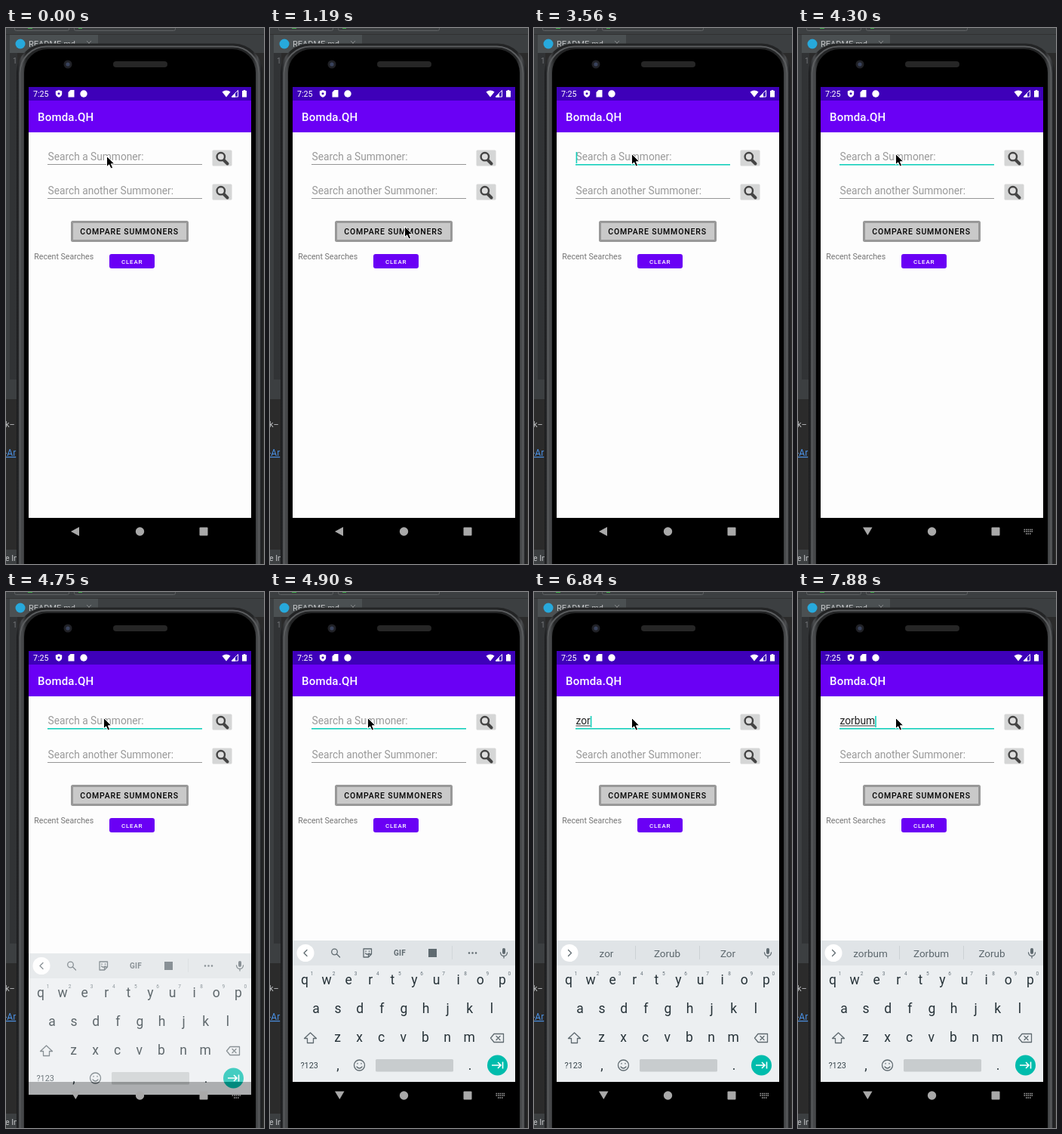
An HTML page for the animation above (8000 ms loop, 342 by 709 pixels).

```html
<!DOCTYPE html>
<html lang="en">
<head>
<meta charset="utf-8">
<title>Search screen</title>
<style>
  html, body { margin: 0; width: 100%; height: 100%; overflow: hidden; background: #2b2b2b; }
  svg { display: block; width: 342px; height: 709px; font-family: Roboto, "Noto Sans", sans-serif; }
  .hint { font-size: 13.75px; fill: #999; }
  .typed { font-size: 13.75px; fill: #222; }
  .medium { font-weight: 500; }
  .key { font-size: 17.5px; fill: #263238; text-anchor: middle; }
  .digit { font-size: 6.5px; fill: #66727a; text-anchor: middle; }
  .word { font-size: 13.5px; fill: #5c676d; text-anchor: middle; }
  .ide { font-size: 11px; fill: #c4c6c8; }
  .line { fill: none; stroke: #5f6a70; stroke-width: 1.3; stroke-linecap: round; stroke-linejoin: round; }
</style>
</head>
<body>
<svg viewBox="0 0 342 709">
  <defs>
    <g id="lens">
      <rect width="26" height="21" rx="1.5" fill="#d5d6d6"/>
      <path d="M14.5 12.5 L20 18" stroke="#444" stroke-width="4" stroke-linecap="round"/>
      <circle cx="11.3" cy="8.7" r="5.2" fill="#dedede" stroke="#444" stroke-width="2.4"/>
    </g>
    <linearGradient id="rim">
      <stop offset="0" stop-color="#17181a"/>
      <stop offset=".022" stop-color="#4b4d4f"/>
      <stop offset=".04" stop-color="#232425"/>
      <stop offset=".96" stop-color="#232425"/>
      <stop offset=".98" stop-color="#4b4d4f"/>
      <stop offset="1" stop-color="#17181a"/>
    </linearGradient>
  </defs>

  <!-- editor behind the phone -->
  <rect width="342" height="709" fill="#2b2b2b"/>
  <rect width="342" height="33" fill="#3c3f41"/>
  <rect width="5" height="466" fill="#3c3f41"/>
  <rect x="5" y="33" width="10" height="432" fill="#313335"/>
  <g fill="none" stroke="#5e6163">
    <rect x="11.5" y="-9" width="72" height="12.5" rx="2"/>
    <rect x="90.5" y="-9" width="134" height="12.5" rx="2"/>
    <path d="M0 8.5 H342" stroke="#323232"/>
  </g>
  <path d="M29 0 h6 M96 0 h5" stroke="#3fae49" stroke-width="2"/>
  <rect x="5" y="9" width="117" height="24" fill="#4b5052"/>
  <circle cx="19" cy="21" r="6.5" fill="#27a9dc"/>
  <text class="ide" x="30" y="25">README.md</text>
  <path d="M107 17 l6 6 m0 -6 l-6 6" stroke="#85888a"/>
  <text class="ide" x="9" y="47" style="font-size:10px;fill:#75787b">1</text>
  <rect y="465" width="18" height="26" fill="#3c3f41"/>
  <text class="ide" x="-1" y="528">k–</text>
  <text class="ide" x="-2" y="566" style="font-size:12px;fill:#4a8fe2;text-decoration:underline">-Ar</text>
  <rect y="690" width="20" height="19" fill="#3c3f41"/>
  <text class="ide" x="-1" y="705" style="font-size:10.5px">e In</text>

  <!-- phone -->
  <rect x="14" y="20.5" width="326" height="760" rx="38" fill="url(#rim)"/>
  <rect x="18.5" y="24.5" width="317" height="760" rx="35" fill="none" stroke="#5b5d5f" stroke-width="2"/>
  <rect x="24" y="28" width="307" height="760" rx="31"/>
  <rect x="142" y="44" width="72" height="8" rx="4" fill="#262626"/>
  <circle cx="82" cy="48" r="5.5" fill="#202126"/>
  <circle cx="82" cy="48" r="2.6" fill="#39435c"/>

  <!-- app -->
  <rect x="30" y="78" width="295" height="570" fill="#fdfdfd"/>
  <rect x="30" y="78" width="295" height="18" fill="#3e00b9"/>
  <rect x="30" y="96" width="295" height="42" fill="#6a00f5"/>
  <g fill="#fff">
    <text x="36" y="91" font-size="10.7">7:25</text>
    <path d="M70 82 l4.2 1.6 v3.2 q0 3.5 -4.2 5 q-4.200 -1.500 -4.200 -5 v-3.200z"/>
    <circle cx="70" cy="86.700" r="1.500" fill="#3e00b9"/>
    <path d="M85.500 82 h5 v9.500 h-8 v-6.500z"/>
    <circle cx="103" cy="87" r="4.700"/>
    <path d="M286.500 84.500 q5.500 -4 11 0 l-5.500 7z"/>
    <path d="M299 91 L307.500 82.500 V91z" fill="none" stroke="#fff"/>
    <path d="M299 91.500 l5 -5 v5z"/>
    <path d="M313 83 h1.700 v-1 h2.600 v1 h1.700 v8.500 h-6z"/>
    <text class="medium" x="42" y="123" font-size="15" letter-spacing=".2">Bomda.QH</text>
  </g>

  <text class="hint" id="hint" x="55.500" y="175">Search a Summoner:</text>
  <text class="typed" id="typed" x="55.500" y="175"></text>
  <rect id="under" x="55.500" y="176.500" height="1" fill="#333"/>
  <rect id="field" x="55" y="180" width="205" height="1" fill="#969696"/>
  <rect id="caret" y="164" width="1.600" height="15" fill="#14d0bb"/>
  <text class="hint" x="55.500" y="220">Search another Summoner:</text>
  <rect x="55" y="225" width="205" height="1" fill="#969696"/>
  <use href="#lens" x="273.500" y="161.500"/>
  <use href="#lens" x="273.500" y="206.500"/>
  <rect x="87.500" y="256.500" width="153" height="25" rx="1" fill="#c9c9c9" stroke="#989898" stroke-width="3"/>
  <text class="medium" x="98.300" y="273" font-size="10.500" letter-spacing=".84">COMPARE SUMMONERS</text>
  <text x="37.300" y="306" font-size="10.600" fill="#757575">Recent Searches</text>
  <rect x="137" y="299" width="60" height="19" rx="3" fill="#6a00f5"/>
  <text class="medium" x="153" y="311.500" font-size="8" letter-spacing=".78" fill="#fff">CLEAR</text>

  <g id="board">
    <rect x="30" y="461" width="295" height="187" fill="#eceff1"/>
    <rect x="30" y="461" width="295" height="33" fill="#e0e4e7"/>
    <circle cx="47" cy="477.500" r="11.500" fill="#fff"/>
    <path id="chevron" class="line" d="M49 473.500 l-4 4 l4 4"/>
    <g id="tools">
      <circle class="line" cx="85.500" cy="476" r="3.800"/>
      <path class="line" d="M88.500 479 l4 4"/>
      <path class="line" d="M124 472 h10.500 v7 l-4 4 h-6.500z M130.500 483 v-4 h4 M126.500 478 q2.500 2.500 5 0 M127 475 v.5 M131.500 475 v.5"/>
      <text x="172" y="481" font-size="10" font-weight="700" fill="#5f6a70" text-anchor="middle" letter-spacing=".3">GIF</text>
      <rect x="210" y="472" width="11" height="11" fill="#5f6a70"/>
      <rect x="241" y="468" width="1" height="18" fill="#d2d7da"/>
      <path d="M264 477.500 h.01 m4.500 0 h.01 m4.500 0 h.01" stroke="#5f6a70" stroke-width="2.600" stroke-linecap="round"/>
    </g>
    <g id="words">
      <path d="M134.500 468 v18 M219.500 468 v18" stroke="#ccd1d4"/>
      <text class="word" x="96" y="483"></text>
      <text class="word" x="176.500" y="483"></text>
      <text class="word" x="257" y="483"></text>
    </g>
    <rect x="308" y="471" width="4" height="8" rx="2" fill="#5f6a70"/>
    <path class="line" d="M305.500 477 q.5 4.500 4.500 4.500 t4.500 -4.500 M310 481.500 v2.500"/>
    <g id="keys"></g>
    <path class="line" d="M53.500 583 l8 7.500 h-4 v6 h-8 v-6 h-4z"/>
    <path class="line" d="M297 584.500 h12.500 v11 h-12.500 l-4.500 -5.500z M300 587.500 l5 5 m0 -5 l-5 5"/>
    <text x="40.500" y="630" font-size="10.800" fill="#37444b">?123</text>
    <circle class="line" cx="118.500" cy="626" r="7"/>
    <path class="line" d="M115 628 q3.500 4 7 0 M116 623.500 v.6 M121 623.500 v.6"/>
    <rect x="140" y="618" width="103" height="16.500" rx="1.500" fill="#c8ccce"/>
    <circle cx="301.500" cy="626" r="13.500" fill="#00bcac"/>
    <path d="M294 626 h12 m-4 -4 l4 4 l-4 4 M308.500 621.500 v9" fill="none" stroke="#fff" stroke-width="1.600"/>
  </g>

  <!-- navigation bar -->
  <g fill="#a9a9a9">
    <path id="back"/>
    <circle cx="177.500" cy="666" r="5.700"/>
    <rect x="256.500" y="660.500" width="11" height="11" rx="1"/>
    <path id="switch" d="M299.500 663.500 h12 M299.500 666 h12 M302 669 h7" stroke="#a9a9a9" stroke-width="1.500" stroke-dasharray="1.500 1"/>
  </g>

  <path id="cursor" d="M.5 .5 V14.700 L3.700 11.800 L6 17 L8.600 15.900 L6.400 10.800 H10.900z" stroke="#fff" stroke-width="1" stroke-linejoin="round"/>
</svg>
<script>
const LOOP = 8000;
const $ = id => document.getElementById(id);

// Each entry changes part of the state from its time on.
const steps = [
  [0, { at: [133, 169], text: "", words: null, focus: false, caret: false, nav: false, board: 0 }],
  [150, { at: [132, 169.5] }],
  [600, { at: [125, 162] }],
  [750, { at: [126, 161] }],
  [1050, { at: [178, 262] }],
  [1200, { at: [323, 606] }],
  [1350, { at: [262, 462] }],
  [1490, { at: [210, 350] }],
  [2530, { at: [211, 350] }],
  [2830, { at: [186, 291] }],
  [2980, { at: [141, 186] }],
  [3130, { at: [129, 166] }],
  [3270, { focus: true }],
  [3560, { caret: true }],
  [4010, { caret: false }],
  [4300, { nav: true }],
  [4750, { board: 0.73 }],
  [4900, { board: 1 }],
  [5350, { text: "z", caret: true }],
  [5500, { words: ["z", "Zero", "Zone"] }],
  [5940, { caret: false }],
  [6240, { text: "zo", caret: true, words: ["zo", "Zoo", "Zone"] }],
  [6840, { text: "zor", words: ["zor", "Zorub", "Zor"] }],
  [7130, { text: "zorb" }],
  [7280, { words: ["zorb", "Zorb", "Zorub"] }],
  [7430, { text: "zorbu", words: ["zorbu", "Zorbu", "Zorub"] }],
  [7880, { text: "zorbum", words: ["zorbum", "Zorbum", "Zorub"] }]
];

function addText(cls, x, y, s) {
  const el = document.createElementNS("http://www.w3.org/2000/svg", "text");
  el.setAttribute("class", cls);
  el.setAttribute("x", x);
  el.setAttribute("y", y);
  el.textContent = s;
  $("keys").append(el);
}

const addRow = (letters, x, y) =>
  [...letters].forEach((c, i) => addText("key", x + i * 29.1, y, c));

addRow("qwertyuiop", 46, 519);
addRow("asdfghjkl", 61, 556.5);
addRow("zxcvbnm", 89.5, 595);
addText("key", 90, 632, ",");
addText("key", 265, 632, ".");
[..."1234567890"].forEach((d, i) => addText("digit", 55.5 + i * 29.1, 507, d));

const show = (id, on) => $(id).style.visibility = on ? "visible" : "hidden";

function draw(t) {
  const s = Object.assign({}, ...steps.filter(([start]) => start <= t).map(([, part]) => part));
  $("cursor").setAttribute("transform", `translate(${s.at})`);

  show("hint", !s.text);
  $("typed").textContent = s.text;
  const width = s.text ? $("typed").getComputedTextLength() : 0;
  $("under").setAttribute("width", width);
  $("caret").setAttribute("x", 55.6 + width);
  show("caret", s.caret);
  $("field").setAttribute("height", s.focus ? 1.6 : 1);
  $("field").setAttribute("fill", s.focus ? "#14d0bb" : "#969696");

  $("board").setAttribute("opacity", s.board);
  $("board").setAttribute("transform", `translate(0 ${s.board < 1 ? 17 : 0})`);
  show("tools", !s.words);
  show("words", s.words);
  $("words").querySelectorAll("text").forEach((el, i) => el.textContent = s.words ? s.words[i] : "");
  $("chevron").setAttribute("d", s.words ? "M45.5 473.5 l4 4 l-4 4" : "M49 473.5 l-4 4 l4 4");

  $("back").setAttribute("d", s.nav ? "M86 660.5 h12.5 l-6.2 10.500z" : "M97 660 v12 l-11 -6z");
  show("switch", s.nav);
}

const origin = performance.now();
function tick() {
  draw((performance.now() - origin) % LOOP);
  requestAnimationFrame(tick);
}
tick();
</script>
</body>
</html>
```
